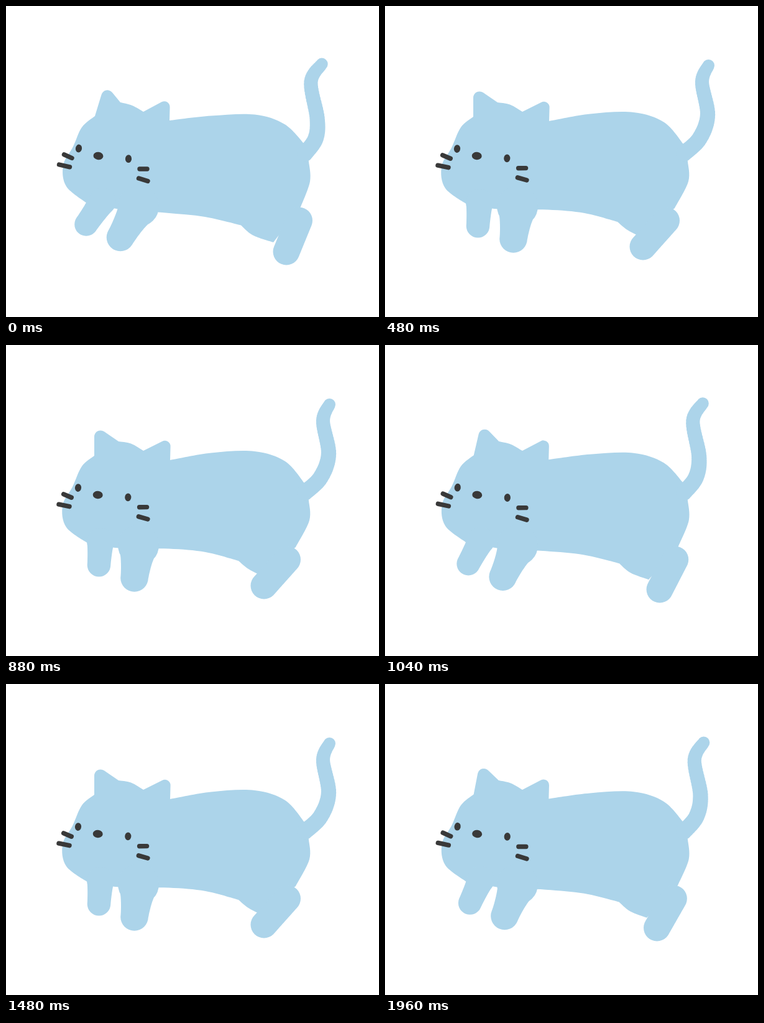
An HTML page with a canvas that plays this animation: 600x500 px, repeating every 2 s.

```html
<!DOCTYPE html>
<html lang="en">
<head>
<meta charset="utf-8">
<title>Running cat</title>
<style>
html, body { margin: 0; width: 100%; height: 100%; overflow: hidden; background: #fff; }
canvas { display: block; }
</style>
</head>
<body>
<canvas id="stage" width="600" height="500"></canvas>
<script>
const ctx = document.getElementById('stage').getContext('2d');
const FUR = '#acd4ea';
const INK = '#393939';

// Pose: 0 is stretched out, larger values gather the legs in.
let pose = 0;

// A key point is [x, y] plus an optional shift per unit of pose.
const place = ([x, y, dx = 0, dy = 0]) => [x + dx * pose, y + dy * pose];

// Control points of a smooth open curve through all key points.
function spline(points) {
  const q = points.map(place);
  return q.slice(1).map((c, i) => {
    const b = q[i], a = q[i - 1] || b, d = q[i + 2] || c;
    return [b, b.map((v, n) => v + (c[n] - a[n]) / 6),
      c.map((v, n) => v - (d[n] - b[n]) / 6), c];
  });
}

function curve(...points) {
  for (const [, p, q, end] of spline(points)) ctx.bezierCurveTo(...p, ...q, ...end);
}

function ear(tip, base, radius) {
  const end = place(base);
  ctx.arcTo(...place(tip), ...end, radius);
  ctx.lineTo(...end);
}

// A rounded limb: discs along a curve, their radius easing from r0 to r1.
function limb(r0, r1, ...points) {
  const parts = spline(points), steps = 48;
  ctx.beginPath();
  for (let i = 0; i <= steps; i++) {
    const t = i / steps;
    const n = Math.min(Math.floor(t * parts.length), parts.length - 1);
    const s = t * parts.length - n, m = 1 - s;
    const [a, b, c, d] = parts[n];
    const [x, y] = [0, 1].map(k =>
      m ** 3 * a[k] + 3 * m * m * s * b[k] + 3 * m * s * s * c[k] + s ** 3 * d[k]);
    const r = r0 + (r1 - r0) * t * t;
    ctx.moveTo(x + r, y);
    ctx.arc(x, y, r, 0, Math.PI * 2);
  }
  ctx.fill();
}

function drawBody() {
  const cheek = [143, 177, -1, 1], brow = [184, 155, -3, 0];
  const nape = [263, 184, 1, 1], hip = [480, 222];
  const heel = [430, 380, -24, -11.5], groin = [378, 352.5, -4, -5.5];
  const chin = [130, 317, 3, 2.5];

  ctx.beginPath();
  ctx.moveTo(...place(cheek));
  ear([159, 124.5, -17, 4], brow, 10);
  curve(brow, [203, 160, -2, -1.5], [221, 170]);
  ear([264, 147, 1, 1], nape, 9);
  curve(nape, [330, 176.5, 0, -3], [400, 174.5, 0, -3.5], [448, 190, 1, -3], hip);
  ctx.lineTo(487, 250);
  curve([487, 250], [489, 282, -1, 0], [474, 323, -8, 2]);
  ctx.lineTo(...place(heel));
  curve(heel, [397, 368.5, -8, -9], groin);
  curve(groin, [320, 339, 1, -6], [257, 332.5, 5, -5], [186, 327, 2, 0], chin);
  curve(chin, [97, 290, 0, 3], [92, 256, -1, 2], [108, 226, -1, 2], [122, 195], cheek);
  ctx.fill();
}

function drawLimbs() {
  limb(13, 9.7, [481, 237], [498, 213, 8, 0], [500.5, 180, 18.5, -5],
    [490.5, 122, 19.5, 0], [508, 93.3, 12.3, 2.3]);
  limb(21.5, 21.5, [451, 395, -36, -8], [471.5, 345, -19, 0]);
  limb(22.3, 33, [184, 372, 22.5, 2.5], [213, 322]);
  limb(18.8, 22, [129, 351, 20.5, 2.8], [155, 314, -3, 2]);
}

function spot(x, y, rx, ry, tilt) {
  ctx.beginPath();
  ctx.ellipse(x, y, rx, ry, tilt, 0, Math.PI * 2);
  ctx.fill();
}

function whisker(x1, y1, x2, y2) {
  ctx.beginPath();
  ctx.moveTo(x1, y1);
  ctx.lineTo(x2, y2);
  ctx.stroke();
}

// The features nod together around the nose.
function drawFace() {
  ctx.save();
  ctx.translate(148.5 - 0.8 * pose, 241);
  ctx.rotate(-0.018 * pose);
  spot(-31.5, -12, 5.1, 6.4, 0.15);
  spot(0, 0, 8, 6.2, 0.1);
  spot(48.5, 4.7, 5.1, 6.4, 0.05);
  whisker(-55, -2.2, -42.5, 3.5);
  whisker(-63, 14, -46, 17.8);
  whisker(66.5, 21, 78.5, 21);
  whisker(65, 36, 79.5, 40.5);
  ctx.restore();
}

function drawCat() {
  ctx.fillStyle = '#fff';
  ctx.fillRect(0, 0, 600, 500);
  ctx.fillStyle = FUR;
  drawBody();
  drawLimbs();
  ctx.fillStyle = ctx.strokeStyle = INK;
  ctx.lineWidth = 7.4;
  ctx.lineCap = 'round';
  drawFace();
}

// Three strides a second at 60 ticks, shown every 40 ms.
function stride(ms) {
  const step = Math.floor((ms % 2000) / 40);
  const tick = Math.max(0, Math.ceil(step * 12 / 5) - 1) % 20;
  return 1 - Math.abs(tick - 10) / 10;
}

let start = null;
function loop(now) {
  if (start === null) start = now;
  pose = stride(now - start) / 0.8;
  drawCat();
  requestAnimationFrame(loop);
}
drawCat();
requestAnimationFrame(loop);
</script>
</body>
</html>
```
